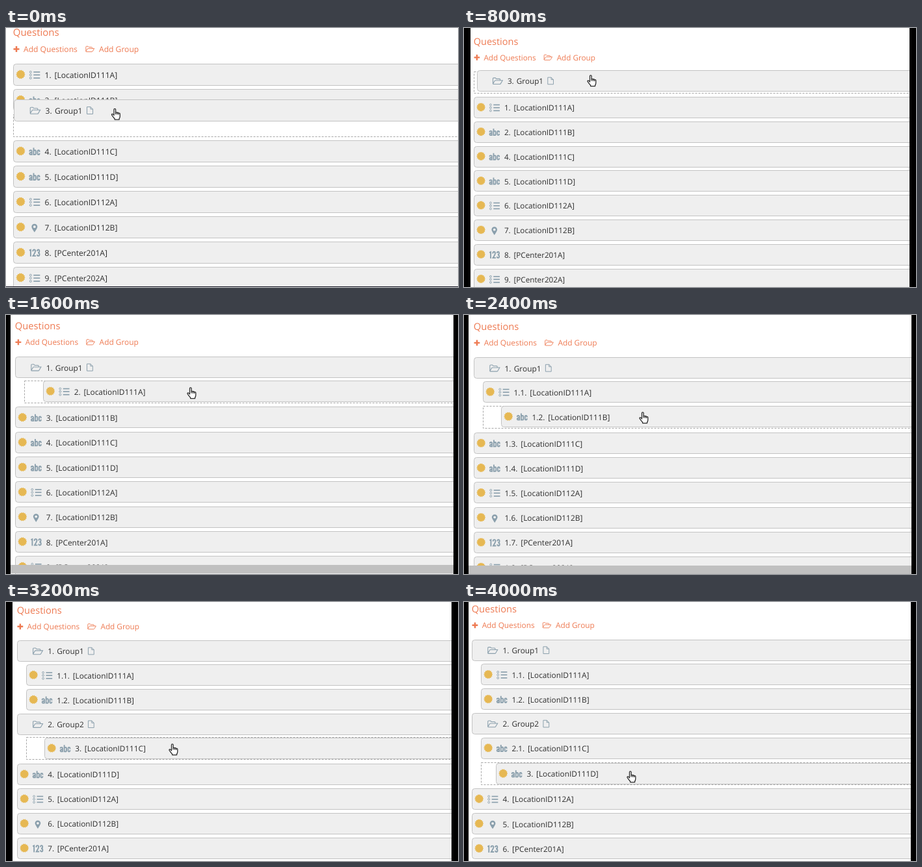
These frames come from a looping animation (695 by 399 pixels, 4800 ms). An HTML page:

```html
<!DOCTYPE html>
<html lang="en">
<head>
<meta charset="utf-8">
<title>Question list</title>
<style>
  html, body { margin: 0; width: 100%; height: 100%; overflow: hidden; background: #fff; }
  svg { display: block; position: absolute; left: 0; top: 0; }
  text { font: 12.1px "Open Sans", sans-serif; fill: #2e2e2e; text-rendering: geometricPrecision; }
  .title { font-size: 15px; fill: #858585; }
  .tool text { fill: #ee7a52; }
  .tool path { stroke: #ee7a52; }
  .box { fill: #efefef; stroke: #c3c3c3; }
  .slot { fill: #fff; stroke: #a6a6a6; stroke-dasharray: 3 2; }
  .icon { fill: none; stroke: #8a9fac; }
  .sun { fill: #e6b853; }
  .scene { visibility: hidden; animation: show 4.8s step-end infinite; }
  @keyframes show {
    0% { visibility: visible; }
    16.666%, 100% { visibility: hidden; }
  }
</style>
</head>
<body>
<svg id="stage" width="695" height="399" viewBox="0 0 695 399"></svg>
<script>
const W = 695, H = 399;

const path = (d, width, extra = '') => `<path d="${d}" stroke-width="${width}" ${extra}/>`;
const rect = (x, y, w, h, attrs) => `<rect x="${x}" y="${y}" width="${w}" height="${h}" ${attrs}/>`;
const place = (x, y, s, body, cls = '') =>
  `<g class="${cls}" transform="translate(${x} ${y}) scale(${s})">${body}</g>`;

const folder = path('M1 10V2.2Q1 1 2.2 1H5L6.5 2.5H11.5Q12.5 2.5 12.5 3.5V5' +
  'M1 10.3L4 5.5Q4.3 5 5 5H16.3L13.2 10.3Q12.8 11 12 11H1.8Q1 11 1 10', 1.1);
const page = path('M.5 .5H6L9.5 4V11.5H.5ZM6 .5V4H9.5', 1);

const icons = {
  folder,
  list: [1.5, 6, 10.8].map(y =>
    `<circle cx="2.5" cy="${y}" r="1.5" stroke-width=".9"/>` + path(`M7 ${y}H17`, 1.7)).join(''),
  abc: path('M1 6V5.6Q1 4 2.7 4Q4.4 4 4.4 5.6V11.6M4.4 7.2Q1 7.6 1 9.3Q1 10.8 2.4 10.8Q4.2 10.6 4.4 9' +
    'M7.2 .3V11.6M7.2 5.5Q8 4 9.3 4Q10.6 4 10.6 6V9Q10.6 10.8 9.2 10.8Q7.6 10.8 7.2 9.6' +
    'M16.2 6.6V5.6Q16.2 4 14.6 4Q13.2 4 13.2 5.6V9.2Q13.2 10.8 14.6 10.8Q16.2 10.8 16.2 9.2V8.4', 1.9),
  num: path('M.6 2.4L2.6 1.4V11.8M6 4V3.4Q6 1.2 8 1.2Q9.8 1.2 9.8 3.4Q9.8 5.2 6.3 10.8H10.8' +
    'M12.7 3.6Q12.7 1.2 14.4 1.2Q16 1.2 16 3.4Q16 5.7 13.8 5.9Q16.2 6.1 16.2 8.4' +
    'Q16.2 10.8 14.4 10.8Q12.7 10.8 12.7 8.6', 1.9),
  pin: path('M8.5 13.5Q4 7 4 5A4.5 4.5 0 0 1 13 5Q13 7 8.5 13.5ZM8.5 3a2 2 0 1 0 0 4a2 2 0 0 0 0-4Z',
    0, 'fill="#8a9fac" fill-rule="evenodd"'),
};

const sunPoints = Array.from({ length: 28 }, (_, i) => {
  const a = i * Math.PI / 14, r = i % 2 ? 5.9 : 7.1;
  return `${(11.5 + r * Math.cos(a)).toFixed(2)},${(16.5 + r * Math.sin(a)).toFixed(2)}`;
}).join(' ');
const sun = `<polygon class="sun" points="${sunPoints}"/>`;

const hand = path('M4.5 11V2.2Q4.5 .8 5.8 .8Q7.1 .8 7.1 2.2V6.8Q8 5.9 9.4 7Q10.6 6.3 11.6 7.6' +
  'Q13.8 7.2 13.8 9.2V12.5Q13.8 14.6 12.6 16V17.6H5.6V16.2Q3.8 14.4 1.2 10.6Q.6 9.2 1.8 8.8Q3 8.6 4.5 11Z' +
  'M7.1 6.8V9.6M9.4 7V9.8M11.6 7.6V10', 1.3, 'fill="#fff" stroke="#2b2b2b" stroke-linejoin="round"');

const items = {
  a: ['list', '[LocationID111A]'],
  b: ['abc', '[LocationID111B]'],
  c: ['abc', '[LocationID111C]'],
  d: ['abc', '[LocationID111D]'],
  e: ['list', '[LocationID112A]'],
  f: ['pin', '[LocationID112B]'],
  g: ['num', '[PCenter201A]'],
  h: ['list', '[PCenter202A]'],
  G: ['folder', 'Group1'],
  H: ['folder', 'Group2'],
};

function row(s, [x, y, no, key]) {
  const [icon, label] = items[key];
  const group = icon === 'folder';
  const body = (group ? '' : sun) +
    place(24.3, 11.3, 1, icons[icon], 'icon') +
    `<text x="48.5" y="22">${no}.<tspan dx="4.9">${label}</tspan></text>` +
    (group ? place(112, 11, 1, page, 'icon') : '');
  const top = Math.round(y);
  return rect(x + .5, top + .5, W + 10 - x, Math.round(33 * s), 'rx="4" class="box"') +
    place(x, y, s, body);
}

// Evenly spaced rows, numbered from `first` after an optional prefix.
const run = (x, y, step, keys, first, prefix = '') =>
  [...keys].map((key, i) => [x, y + i * step, prefix + (first + i), key]);

function header(x, base, s) {
  return place(x, base, s,
    '<text class="title" x="-.3" y="-25">Questions</text>' +
    path('M.5 -4.5H9.5M5 -9V0', 2.5) +
    '<text x="16">Add Questions</text>' +
    place(111, -9.6, .84, folder) +
    '<text x="132">Add Group</text>', 'tool" fill="none');
}

function scene({ x, s, base, rows, slot, drag, cursor, left = 0, right = W, foot = '' }, i) {
  const [sx, sy, sh] = slot;
  return `<g class="scene" style="animation-delay:${((i - 6) * .8).toFixed(1)}s">` +
    rect(0, 0, W, H, 'fill="#fff"') +
    header(x, base, s) +
    rows.map(r => row(s, r)).join('') +
    rect(sx + .5, sy + .5, W + 10 - sx, sh, 'class="slot"') +
    row(s, drag) +
    place(...cursor, 1, hand) +
    foot +
    rect(0, 0, left, H, '') + rect(right, 0, W - right, H, '') +
    '</g>';
}

const grayBar = (y, h) => rect(0, y, W, h, 'fill="#c0c0c0"');

const scenes = [
  {
    x: 11, s: 1, base: 37,
    rows: [...run(11, 55, 39, 'ab', 1), ...run(11, 173, 39, 'cdefgh', 4)],
    slot: [11, 133, 34], drag: [12, 110, 3, 'G'], cursor: [161.5, 123.5],
    foot: rect(0, 398, W, 1, 'fill="#1d1d2b"'),
  },
  {
    x: 15, s: .967, base: 49.7, left: 10, right: 685,
    rows: [...run(15, 106, 37.75, 'ab', 1), ...run(15, 181.5, 37.8, 'cdefgh', 4)],
    slot: [15, 67, 33], drag: [20, 65, 3, 'G'], cursor: [189, 72],
  },
  {
    x: 14, s: .982, base: 46.3, left: 7, right: 688,
    rows: [[14, 64, 1, 'G'], ...run(14, 141.4, 38.3, 'bcdefgh', 3)],
    slot: [28, 101, 34], drag: [57, 101, 2, 'a'], cursor: [278, 111],
    foot: grayBar(385, 13),
  },
  {
    x: 15, s: .981, base: 47.3, left: 7, right: 688,
    rows: [[15, 65, 1, 'G'], [29, 102, '1.1', 'a'], ...run(15, 181, 38.2, 'cdefgh', 3, '1.')],
    slot: [29, 140, 34], drag: [57, 140, '1.2', 'b'], cursor: [269, 149],
    foot: grayBar(386, 13),
  },
  {
    x: 17, s: .973, base: 42.2, left: 10, right: 685,
    rows: [[17, 59, 1, 'G'], ...run(31, 96.3, 38, 'ab', 1, '1.'), [17, 171.7, 2, 'H'],
      ...run(17, 249, 38, 'defg', 4)],
    slot: [31, 208, 34], drag: [59, 209, 3, 'c'], cursor: [250, 218],
  },
  {
    x: 12, s: .977, base: 40.2, left: 7, right: 687,
    rows: [[12, 57.6, 1, 'G'], ...run(26, 95.4, 38, 'ab', 1, '1.'), [12, 171, 2, 'H'],
      [26, 208.6, '2.1', 'c'], ...run(12, 287, 38.2, 'efg', 4)],
    slot: [26, 247, 34], drag: [49, 248, 3, 'd'], cursor: [250, 260],
  },
];

document.getElementById('stage').innerHTML = scenes.map(scene).join('');
</script>
</body>
</html>
```
